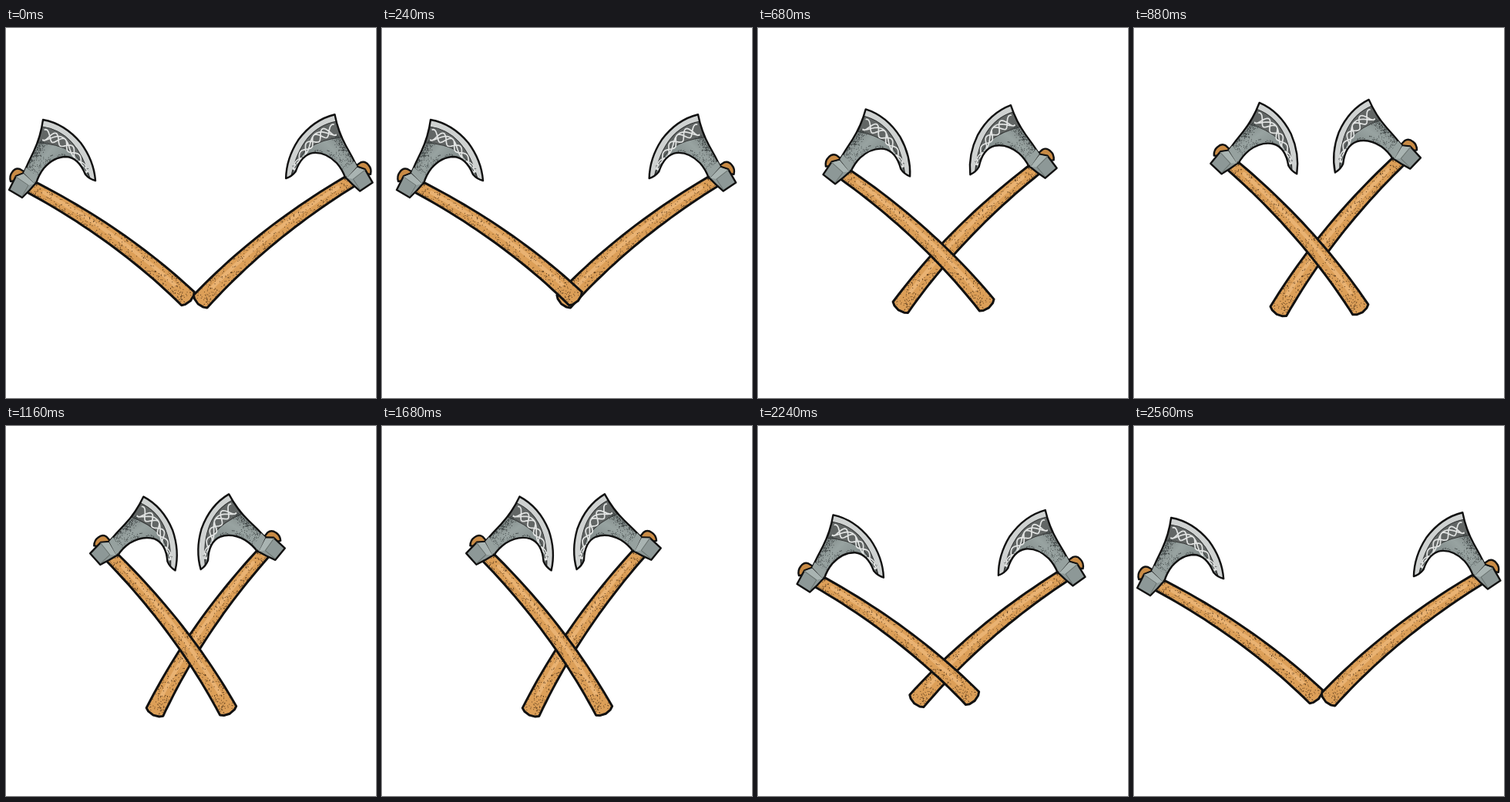
An HTML page that plays this animation: 480 px wide and 480 px high, repeating every 2.6 s.

```html
<!DOCTYPE html>
<html lang="en">
<head>
<meta charset="utf-8">
<title>Crossing axes</title>
<style>
  html, body { margin: 0; width: 100%; height: 100%; overflow: hidden; background: #fff; }
  svg { display: block; width: 100vw; height: 100vh; }
</style>
</head>
<body>
<svg viewBox="0 0 480 480">
  <defs>
    <linearGradient id="steel" gradientUnits="userSpaceOnUse" x1="30" y1="150" x2="70" y2="185">
      <stop offset="0" stop-color="#777f7e"/>
      <stop offset=".5" stop-color="#98a3a1"/>
      <stop offset="1" stop-color="#828c8b"/>
    </linearGradient>
    <clipPath id="headClip"><path id="headShape" d="M48 119 Q76 124 97 149 Q114 172 116 198 Q108 196 103 190 Q94 168 78 167 Q62 167 49 182 Q42 191 39 202 L23 188 Q29 174 36 160 Q45 141 48 119Z"/></clipPath>
    <g id="axe" stroke-linejoin="round" stroke-linecap="round">
      <path d="M6 199 Q4 192 8 187 Q12 181 18 183 L23 186 L21 197Z" fill="#c98b45" stroke="#111" stroke-width="2.4"/>
      <path id="wood" fill="#dc9f58" stroke="#111" stroke-width="3"/>
      <path id="shine" fill="none" stroke="#e9b272" stroke-width="5"/>
      <path id="grain" stroke="#56381a" stroke-width="1.05"/>
      <g clip-path="url(#headClip)">
        <use href="#headShape" fill="url(#steel)"/>
        <path d="M48 119 Q110 125 117 199 L109 195 Q92 134 47 128Z" fill="#cfd2d1"/>
        <path d="M47 128 Q92 134 109 195 Q96 168 84 160 Q66 150 42 149Z" fill="#626665" stroke="#343636" stroke-width="1"/>
        <path id="knot" fill="none" stroke="#e2e4e3" stroke-width="1.7"/>
        <path id="pits" stroke="#3a4040" stroke-width="1"/>
      </g>
      <use href="#headShape" fill="none" stroke="#111" stroke-width="2.4"/>
      <path d="M4 210 L13 192 L23 188 L38 202 L30 211 L21 220Z" fill="#8d9897" stroke="#111" stroke-width="2.4"/>
      <path d="M13 193 L23 189 L37 202 L29 204Z" fill="#a9b4b2"/>
      <path d="M23 188 L26 181 L40 192 L37 202Z" fill="#96a19f"/>
      <path d="M13 193 L29 204 L21 218" fill="none" stroke="#69726f" stroke-width="1"/>
    </g>
  </defs>
  <use id="right" href="#axe"/>
  <use id="left" href="#axe"/>
</svg>
<script>
const $ = id => document.getElementById(id);
const PIVOT = '187 289';
const LOOP = 2600, STEP = 40;

let seed = 11;
const rnd = () => (seed = seed * 16807 % 2147483647) / 2147483647;

// Point on a quadratic curve, pushed sideways along its normal
function offsetPoint([a, c, b], u, off) {
  const v = 1 - u;
  const at = i => v * v * a[i] + 2 * v * u * c[i] + u * u * b[i];
  const slope = i => v * (c[i] - a[i]) + u * (b[i] - c[i]);
  const dx = slope(0), dy = slope(1), len = Math.hypot(dx, dy);
  return [at(0) - dy / len * off, at(1) + dx / len * off];
}

const line = pts => 'M' + pts.map(p => p.map(n => n.toFixed(1)).join(' ')).join('L');
const sample = (curve, n, off, from = 0, to = 1) =>
  Array.from({ length: n + 1 }, (_, i) => {
    const u = from + (to - from) * i / n;
    return offsetPoint(curve, u, off(u));
  });
const dot = ([x, y]) => `M${x.toFixed(1)} ${y.toFixed(1)}h.1`;

const shaft = [[30, 205], [147, 266], [236, 351]];
const half = u => 8.3 + 3.7 * u;

const upperEdge = sample(shaft, 24, u => -half(u));
const lowerEdge = sample(shaft, 24, half).reverse();
const buttEnd = [-.65, 0, .65].map(k => offsetPoint(shaft, 1.018 - .01 * Math.abs(k), k * 12));
$('wood').setAttribute('d', line([...upperEdge, ...buttEnd, ...lowerEdge]) + 'Z');
$('shine').setAttribute('d', line(sample(shaft, 20, () => -1.5, .08, .9)));

let grain = '';
for (let i = 0; i < 1000; i++) {
  const u = rnd(), v = rnd() * 2 - 1;
  const density = .1 + .55 * v * v + (v > 0 ? .15 : 0) + (u > .86 ? .3 : 0);
  if (rnd() < density) grain += dot(offsetPoint(shaft, u, v * (half(u) - 1.5)));
}
$('grain').setAttribute('d', grain);

const band = [[46, 138], [84, 143], [106, 190]];
const strand = (turns, phase) => line(sample(band, 60,
  u => (7.6 - 5.4 * u) * Math.sin(2 * Math.PI * turns * u + phase), .04, .97));
$('knot').setAttribute('d', strand(3, .4) + strand(3, 3.54) + strand(1.5, 1.2));

let pits = '';
const backEdge = [[25, 186], [38, 160], [46, 145]];
const innerEdge = [[42, 190], [64, 148], [104, 186]];
for (let i = 0; i < 190; i++) {
  pits += dot(offsetPoint(backEdge, rnd(), rnd() * rnd() * 15));
  if (i % 3 === 0) pits += dot(offsetPoint(innerEdge, rnd(), -rnd() * 5));
}
$('pits').setAttribute('d', pits);

const ease = (t, from, to) => {
  const k = Math.min(1, Math.max(0, (t - from) / (to - from)));
  return (1 - Math.cos(Math.PI * k)) / 2;
};

const pose = (x, y, angle) => `translate(${x} ${y}) rotate(${angle} ${PIVOT})`;

function draw(now) {
  const t = Math.floor(now % LOOP / STEP) * STEP;
  const slide = ease(t, 0, 800) - ease(t, 1980, 2580);
  const turn = ease(t, 260, 1200) - ease(t, 1668, 2390);
  $('left').setAttribute('transform', pose(73 * slide, 6.5 * turn, 17.5 * turn));
  $('right').setAttribute('transform',
    'translate(480 0) scale(-1 1) ' + pose(-4.5 + 80 * slide, 1 + 6 * turn, 3.3 + 17 * turn));
}

const startTime = performance.now();
function tick() {
  draw(performance.now() - startTime);
  requestAnimationFrame(tick);
}
tick();
</script>
</body>
</html>
```
